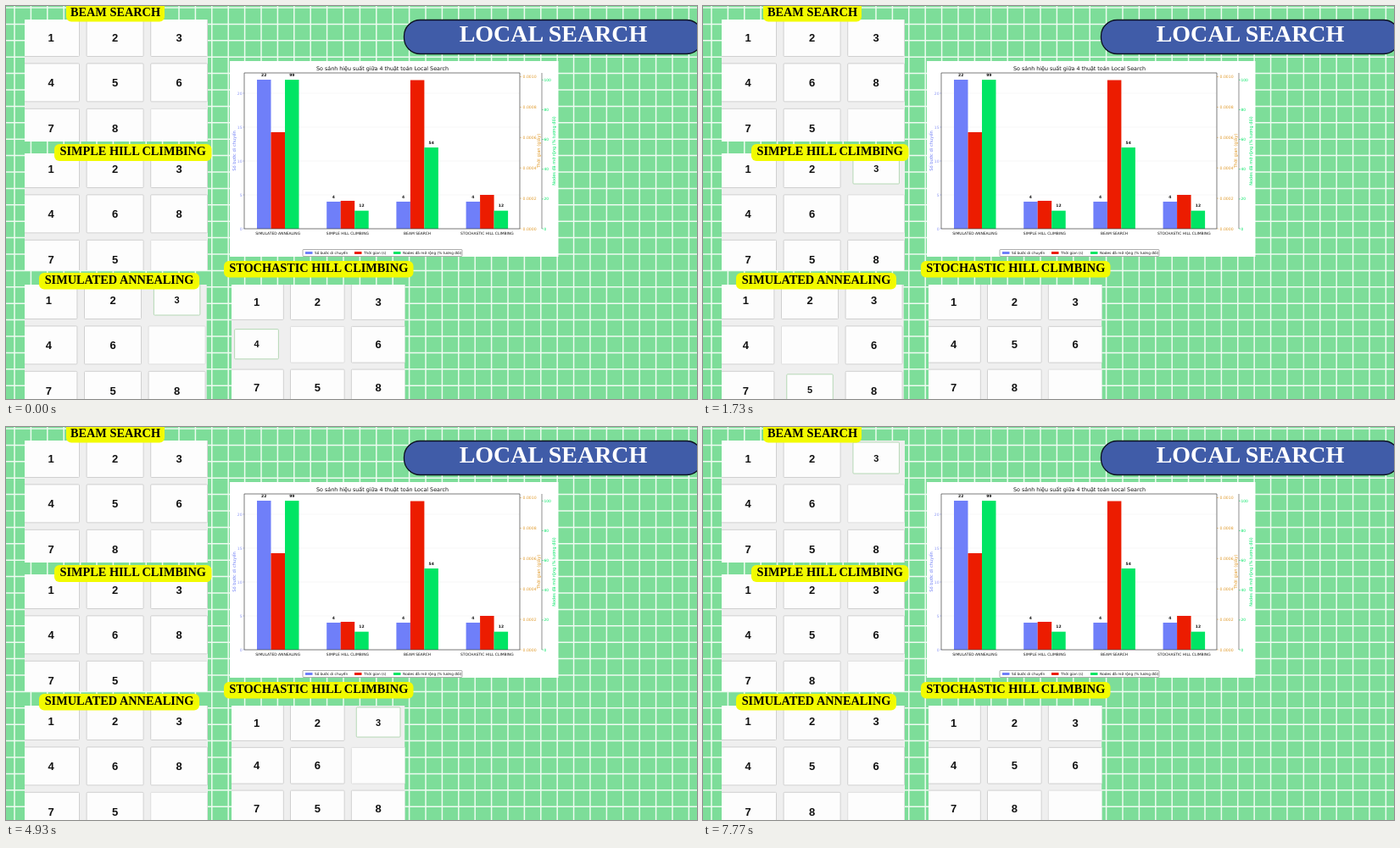
Write an HTML page that moves like this. It is 815 px wide and 464 px high and loops after 8000 ms.

```html
<!DOCTYPE html>
<html lang="vi">
<meta charset="utf-8">
<title>Local Search</title>
<style>
  html, body { margin: 0; width: 100%; height: 100%; overflow: hidden; background: #7ddd99 }
  svg { display: block }
  .digit { font: bold 13px "Liberation Sans", sans-serif; text-anchor: middle; fill: #111 }
  .tag { font: bold 14.3px "Liberation Serif", serif; text-anchor: middle }
  .head { font: bold 28px "Liberation Serif", serif; text-anchor: middle; fill: #fff }
  .chart { font-family: "DejaVu Sans", sans-serif }
</style>
<svg id="stage" width="815" height="464" viewBox="0 0 815 464"></svg>
<script>
const stage = document.getElementById('stage');
const LOOP = 8000;

const rect = (x, y, w, h, fill, more = '') =>
  `<rect x="${x}" y="${y}" width="${w}" height="${h}" fill="${fill}" ${more}/>`;
const line = (x1, y1, x2, y2, color, width) =>
  `<path d="M${x1} ${y1}L${x2} ${y2}" stroke="${color}" stroke-width="${width}"/>`;
const text = (x, y, s, size, fill = '#111', anchor = 'middle', more = '') =>
  `<text x="${x}" y="${y}" font-size="${size}" fill="${fill}" text-anchor="${anchor}" ${more}>${s}</text>`;
const upright = (x, y, s, size, fill) =>
  text(0, 0, s, size, fill, 'middle', `transform="translate(${x} ${y}) rotate(-90)"`);

function background() {
  const pitch = 19.4;
  let s = rect(0, 0, 815, 464, '#7ddd99');
  for (let x = 10; x < 815; x += pitch) s += line(x, 0, x, 464, '#eefbf1', 1.5);
  for (let y = 2; y < 464; y += pitch) s += line(0, y, 815, y, '#eefbf1', 1.5);
  return s;
}

function chart() {
  const BLUE = '#6f7ff9', RED = '#ec1c00', GREEN = '#00e564', ORANGE = '#e09a2c';
  const base = 263, bold = 'font-weight="bold"';
  const groups = [
    ['SIMULATED ANNEALING', 22, 114, 99],
    ['SIMPLE HILL CLIMBING', 4, 33, 12],
    ['BEAM SEARCH', 4, 175.5, 54],
    ['STOCHASTIC HILL CLIMBING', 4, 40, 12]
  ];
  let s = rect(264, 65, 387.5, 231, '#fff');
  for (let v = 0; v <= 20; v += 5) {
    const y = base - v * 8;
    s += line(281, y, 606, y, '#eee', .5) + line(279.5, y, 281, y, BLUE, .5);
    s += text(278.5, y + 1.6, v, 4.5, '#8d98f5', 'end');
  }
  groups.forEach(([name, steps, time, nodes], i) => {
    const x = 296 + i * 82.2;
    const h = steps * 8, n = nodes * 1.777;
    s += rect(x, base - h, 16.5, h, BLUE) + rect(x + 16.5, base - time, 16.5, time, RED)
       + rect(x + 33, base - n, 16.5, n, GREEN)
       + text(x + 8.2, base - h - 4.5, steps, 4.5, '#111', 'middle', bold)
       + text(x + 41.3, base - n - 4.5, nodes, 4.5, '#111', 'middle', bold)
       + text(x + 24.7, 269.5, name, 4.45);
  });
  for (let i = 0; i <= 5; i++) {
    const y = base - i * 35.9, y2 = base - i * 35.15;
    s += line(606, y, 608, y, ORANGE, .5) + line(632, y2, 634, y2, GREEN, .5)
       + text(609.5, y + 1.6, (i * .0002).toFixed(4), 4.6, ORANGE, 'start')
       + text(634.5, y2 + 1.6, i * 20, 4.4, GREEN, 'start');
  }
  s += `<path d="M281 263V79H606V263Z" fill="none" stroke="#444" stroke-width=".7"/>`
     + line(632, 79, 632, 263, '#444', .6)
     + text(444, 75.7, 'So sánh hiệu suất giữa 4 thuật toán Local Search', 6.35)
     + upright(271, 171, 'Số bước di chuyển', 5.2, '#7583f5')
     + upright(629.5, 171, 'Thời gian (giây)', 5.2, ORANGE)
     + upright(648, 171, 'Nodes đã mở rộng (% tương đối)', 5, GREEN)
     + rect(350, 287.5, 188, 8, '#fff', 'stroke="#777" stroke-width=".6" rx="1"');
  [[353, BLUE, 'Số bước di chuyển'], [411, RED, 'Thời gian (s)'], [457, GREEN, 'Nodes đã mở rộng (% tương đối)']]
    .forEach(([x, color, name]) => {
      s += rect(x, 290, 8.5, 3, color) + text(x + 11, 293, name, 4.25, '#111', 'start');
    });
  return `<g class="chart">${s}</g>`;
}

const tag = (x, y, w, h, label) =>
  rect(x, y, w, h, '#f2fb00', 'rx="6"') +
  `<text class="tag" x="${x + w / 2}" y="${y + h - 6.6}">${label}</text>`;

// Puzzle positions on the way to the goal; 0 is the gap.
const BOARDS = { S: '123468750', A: '123460758', B: '123406758', C: '123456708', G: '123456780' };

// Steps are [start ms, position + raised tile].
const puzzles = [
  { x: 22, y: 16, w: 216, h: 144, cx: 53, cy: 37, k: 1,
    steps: [[0, 'G'], [1470, 'S'], [2780, 'A3'], [3760, 'B4'], [4380, 'C'], [4800, 'G'], [6390, 'S'], [7700, 'A3']] },
  { x: 22, y: 174, w: 216, h: 138, cx: 53, cy: 192, k: 1,
    steps: [[0, 'S'], [1400, 'A3'], [1800, 'B4'], [2220, 'C'], [2780, 'G'], [3830, 'S'], [5600, 'A3'],
      [6400, 'B4'], [7010, 'C'], [7630, 'G']] },
  { x: 22, y: 329, w: 216, h: 135, cx: 53, cy: 347, k: 1, shiftUntil: 4500,
    steps: [[0, 'A3'], [1470, 'B5'], [2290, 'C'], [2780, 'G'], [4500, 'S'], [5700, 'A3'], [6400, 'B5'],
      [7080, 'C'], [7630, 'G']] },
  { x: 266, y: 329, w: 204.5, h: 135, cx: 295.5, cy: 349, k: .95,
    steps: [[0, 'B4'], [730, 'C'], [1190, 'G'], [3480, 'S'], [4700, 'A3'], [5700, 'B4'], [6400, 'C'], [7630, 'G']] }
];

function board(p, state, shift) {
  let s = rect(0, 0, p.w, p.h, '#efefef');
  [...BOARDS[state[0]]].forEach((n, i) => {
    const x = p.cx - p.x - shift + (i % 3) * 75.6 * p.k;
    const y = p.cy - p.y + Math.floor(i / 3) * 53.4 * p.k;
    const raised = n === state[1];
    const w = (raised ? 54.5 : 67) * p.k, h = (raised ? 37 : 45) * p.k;
    const top = y - h / 2 - (raised ? .5 : 0);
    const border = raised ? '#b5d8b5' : n === '0' ? '#dedede' : '#d0d0d0';
    s += rect(x - w / 2, top, w, h, '#fdfdfd', `rx="1" stroke="${border}"`);
    if (n !== '0')
      s += `<text class="digit" x="${x}" y="${y + (raised ? 3.6 : 4.7)}"${raised ? ' style="font-size:11px"' : ''}>${n}</text>`;
  });
  return s;
}

stage.innerHTML = background() + chart()
  + puzzles.map(p => `<svg class="board" x="${p.x}" y="${p.y}" width="${p.w}" height="${p.h}"></svg>`).join('')
  + tag(71, -5, 116, 23.5, 'BEAM SEARCH')
  + tag(57, 163, 185.5, 20, 'SIMPLE HILL CLIMBING')
  + tag(39, 315, 189, 19.5, 'SIMULATED ANNEALING')
  + tag(257, 301, 223.5, 19.5, 'STOCHASTIC HILL CLIMBING')
  + rect(469.5, 16.5, 352, 40, '#405ca8', 'rx="19" stroke="#0b1020" stroke-width="1.3"')
  + '<text class="head" x="645.5" y="42">LOCAL SEARCH</text>';
const views = stage.querySelectorAll('.board');

function draw(now) {
  const t = now % LOOP;
  puzzles.forEach((p, i) => {
    const state = p.steps.filter(([start]) => start <= t).pop()[1];
    const shift = t < p.shiftUntil ? 2.6 : 0;
    const key = state + shift;
    if (p.key === key) return;
    p.key = key;
    views[i].setAttribute('width', p.w - shift / 2);
    views[i].innerHTML = board(p, state, shift);
  });
}

const begin = performance.now();
draw(0);
requestAnimationFrame(function tick() {
  draw(performance.now() - begin);
  requestAnimationFrame(tick);
});
</script>
</html>
```
